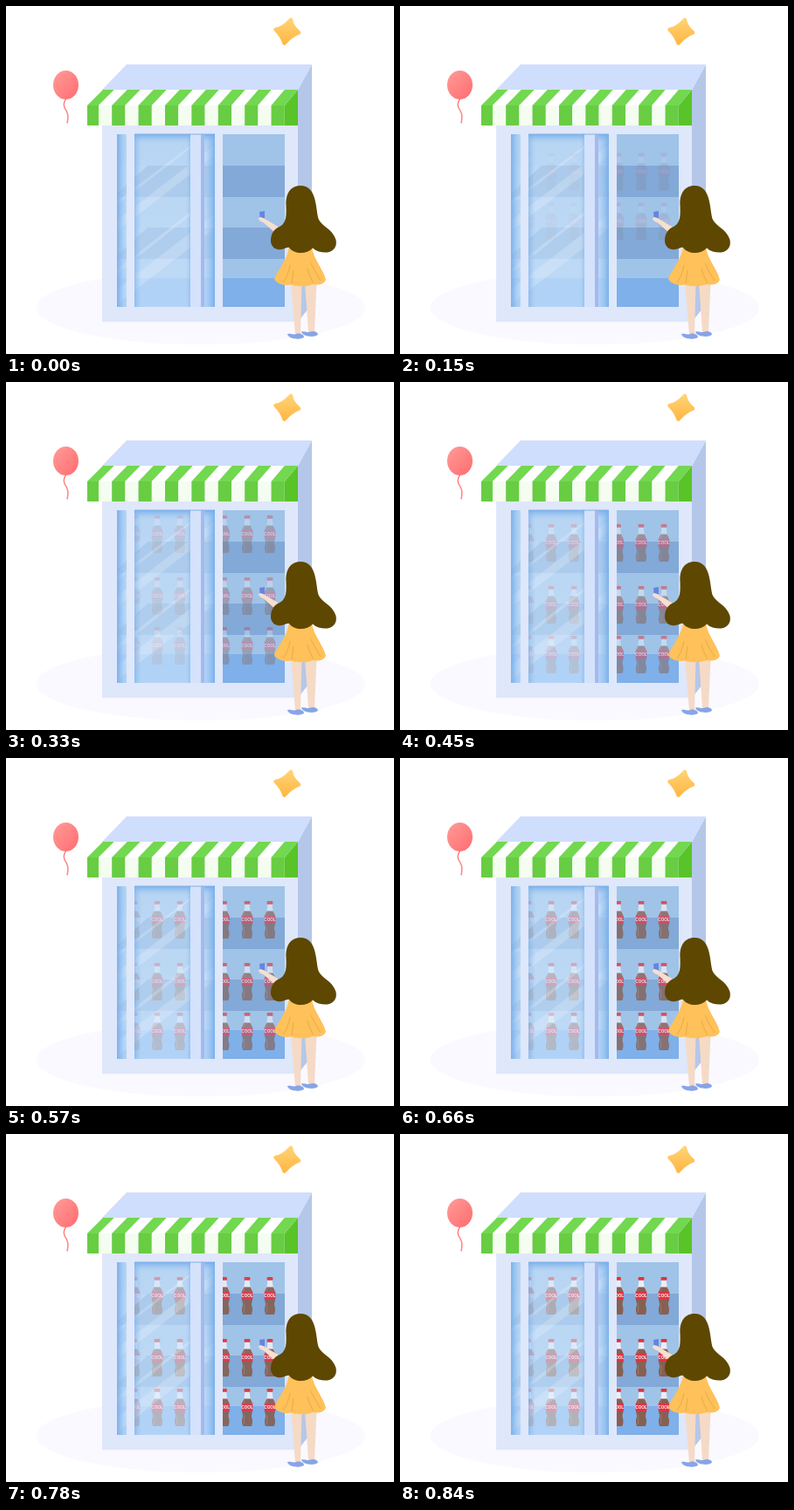
An HTML page for the animation above (1.04 s loop, 444x399 px).

```html
<!DOCTYPE html>
<html lang="en">
<head>
<meta charset="utf-8">
<title>Shop fridge</title>
<style>
  html, body { margin: 0; width: 100%; height: 100%; overflow: hidden; background: #fff; }
  svg { display: block; width: 100vw; height: 100vh; }
  .label { font: 700 4.6px Arial, "Liberation Sans", sans-serif; fill: #fff; text-anchor: middle; }
</style>
</head>
<body>
<svg viewBox="0 0 444 399">
  <defs>
    <linearGradient id="balloon" x1="0" y1="0" x2="1" y2="1">
      <stop offset="0" stop-color="#ff9c98"/><stop offset="1" stop-color="#ff6c70"/>
    </linearGradient>
    <linearGradient id="star" x1="0" y1="0" x2="0" y2="1">
      <stop offset="0" stop-color="#ffd273"/><stop offset="1" stop-color="#ffb846"/>
    </linearGradient>
    <linearGradient id="edgeX">
      <stop offset="0" stop-color="#6fa9e8" stop-opacity=".85"/><stop offset="1" stop-color="#8fbef0" stop-opacity="0"/>
    </linearGradient>
    <linearGradient id="edgeXr" x1="1" x2="0">
      <stop offset="0" stop-color="#6fa9e8" stop-opacity=".85"/><stop offset="1" stop-color="#8fbef0" stop-opacity="0"/>
    </linearGradient>
    <linearGradient id="edgeY" x1="0" y1="0" x2="0" y2="1">
      <stop offset="0" stop-color="#6fa9e8" stop-opacity=".8"/><stop offset="1" stop-color="#8fbef0" stop-opacity="0"/>
    </linearGradient>
    <linearGradient id="glass" x1="0" y1="0" x2="0" y2="1">
      <stop offset="0" stop-color="#cbe4fc" stop-opacity=".55"/><stop offset="1" stop-color="#d3eaff" stop-opacity=".6"/>
    </linearGradient>
    <clipPath id="inside">
      <path d="M147 147H211V345H147ZM248 147H319V345H248Z"/>
    </clipPath>
    <clipPath id="panes">
      <path d="M127 147H138V345H127ZM147 147H211V345H147ZM227 147H239V345H227Z"/>
    </clipPath>
    <g id="bottle">
      <path d="M-2.7 3.5H2.7L3.2 9C3.6 12 6 14 6 18H-6C-6 14 -3.6 12 -3.2 9Z" fill="#e9eef8"/>
      <path d="M-3.7 11.5H3.7C4.6 13.5 6 15 6 18V25C6 28 4.9 29 5 31.5C5.2 34 6.2 35 6 38C5.8 40 5.4 42 4.8 43H-4.8C-5.4 42 -5.8 40 -6 38C-6.2 35 -5.2 34 -5 31.5C-4.9 29 -6 28 -6 25V18C-6 15 -4.6 13.5 -3.7 11.5Z" fill="#866052"/>
      <path d="M-3 13L-4.2 18M-3.4 29.5V41" stroke="#9a7668" stroke-width="1" fill="none"/>
      <rect x="-3.4" width="6.8" height="3.8" rx="1" fill="#e23434"/>
      <rect x="-6.3" y="16.5" width="12.6" height="9.5" rx=".8" fill="#df3444"/>
      <text class="label" y="23">COOL</text>
    </g>
  </defs>

  <ellipse cx="223" cy="346" rx="188" ry="42" fill="#f9f9ff"/>

  <!-- balloon and star -->
  <path d="M69 106C64 113 67 117 69.500 121C72 126 71 130 70 134.500" fill="none" stroke="#ff8382" stroke-width="1.500"/>
  <ellipse cx="68.500" cy="90.500" rx="14.500" ry="16.500" fill="url(#balloon)"/>
  <path d="M326 16Q326.500 23 335 30.500Q327 33.500 318.500 42.500Q316 34.500 308.500 27Q316.500 26 326 16Z" fill="url(#star)" stroke="url(#star)" stroke-width="4.500" stroke-linejoin="round"/>

  <!-- kiosk -->
  <path d="M334 96L350 67V342L334 362Z" fill="#b5c7e9"/>
  <path d="M110 96L138 67H350L334 96Z" fill="#cfdefd"/>
  <path d="M110 96H334V362H110Z" fill="#dfe7fa"/>
  <g id="awning"></g>

  <!-- fridge interior -->
  <g id="shelves"></g>
  <g clip-path="url(#inside)"><g id="stock" opacity="0"></g></g>

  <!-- sliding door -->
  <g clip-path="url(#panes)">
    <path d="M127 147H239V345H127Z" fill="url(#glass)"/>
    <path d="M127 183H162L127 215ZM127 254H162L127 286Z" fill="#c4e0fa" opacity=".65"/>
    <g fill="#fff" opacity=".2">
      <path d="M127 246L239 159V171L127 258Z"/>
      <path d="M127 224L211 160V163L127 228Z"/>
      <path d="M127 325L239 238V255L127 342Z"/>
      <path d="M127 302L211 236V240L127 307Z"/>
    </g>
    <path d="M127 147H138V345H127Z" fill="url(#edgeX)"/>
    <path d="M147 147H155V345H147Z" fill="url(#edgeX)" opacity=".65"/>
    <path d="M206 147H211V345H206Z" fill="url(#edgeXr)" opacity=".45"/>
    <path d="M227 147H239V345H227Z" fill="url(#edgeXr)"/>
    <path d="M147 147H239V157H147Z" fill="url(#edgeY)"/>
  </g>
  <path d="M138 147H147V345H138ZM239 147H248V345H239Z" fill="#dfe7fa"/>
  <path d="M211 147H223V345H211Z" fill="#d5e2fb"/>
  <path d="M223 147H227V345H223Z" fill="#a5b9ee"/>
  <path d="M147 147H239" stroke="#7fb1e9" stroke-width="1"/>

  <!-- shopper -->
  <path d="M290 236L296 235V243.500L290.500 243Z" fill="#6685e0"/>
  <path d="M289 243.500C290 241.500 293 242 296 244L313 254L309 261L295 248.500C292 247 289 246 289 243.500Z" fill="#f6dfcf"/>
  <path d="M326 316H338.500L337 377H331ZM342 316H355.500L353 374H346Z" fill="#f5dac6"/>
  <path d="M322 376C325 375 328 377.500 332 376C336 374.500 341 377 341 379.500C339 383 323 382.500 322 376ZM338 373.500C341 372.500 344 375 348 373.500C352 372 357 374 357 376.500C355 380.500 339 379.500 338 373.500Z" fill="#86a4e8"/>
  <path d="M324 276H350C352 291 363 301 366 314C364 319 357 320.500 351 319C344 322 333 322 326 319.500C319 321 310 319 307 313C311 302 322 291 324 276Z" fill="#ffc15a"/>
  <path d="M325 297C323 306 321 312 317 317M329 303L327 318M345 301C347 309 350 314 352 318M349 295C353 304 357 310 360 315" fill="none" stroke="#e9ab45" stroke-width="1"/>
  <path d="M337 206C325 206 320 216 320.500 228C321 240 321 248 314 252.500C305 256 303 263 303 270C304 277 309 280 315 279C319 278.500 322 276 324 277C330 285 344 285 351 277.500C356 282 362 283 368 282.500C376 281 379 275 377.500 268C374 256 362 253 358 245C354 235 357 206 337 206Z" fill="#5e4700"/>
</svg>

<script>
  const el = id => document.getElementById(id);

  // Awning: slanted top and upright valance share the same stripe edges
  const edges = [93, ...Array.from({ length: 15 }, (_, i) => 106 + 15.2 * i)];
  const topX = x => 111 + (x - 93) * 223 / 226;
  const stripes = edges.slice(1).map((b, i) => {
    const a = edges[i], green = i % 2 === 0;
    return `<path d="M${topX(a)} 96H${topX(b)}L${b} 114H${a}Z" fill="${green ? '#72d84f' : '#fff'}"/>` +
           `<path d="M${a} 114H${b}V137H${a}Z" fill="${green ? '#68cd42' : '#f4fdf0'}"/>`;
  });
  el('awning').innerHTML = stripes.join('') + '<path d="M319 114L334 96V137H319Z" fill="#58c428"/>';

  const bands = [[147, '#a0c3e8'], [183, '#82a9d7'], [219, '#a0c3e8'],
                 [254, '#82a9d7'], [290, '#a0c3e8'], [312, '#7fb0ea'], [345]];
  el('shelves').innerHTML = bands.slice(0, -1).map(([y, fill], i) =>
    `<rect x="127" y="${y}" width="192" height="${bands[i + 1][0] - y}" fill="${fill}"/>`).join('');

  const stock = el('stock');
  stock.innerHTML = [164, 235, 292].map(y => [147, 173, 199, 249.5, 276, 302].map(x =>
    `<use href="#bottle" x="${x}" y="${y}"/>`).join('')).join('');

  // Bottles drop in with a cubic ease-out while fading in, at 30 ms per step
  const LOOP = 1040, STEP = 30, START = 60, FADE = 780, DROP = 490, HEIGHT = 122;
  const clamp = v => Math.min(1, Math.max(0, v));
  const origin = performance.now();

  function draw(now) {
    const t = Math.floor(Math.max(0, now - origin) % LOOP / STEP) * STEP - START;
    const left = 1 - clamp(t / DROP);
    stock.setAttribute('opacity', clamp(t / FADE));
    stock.setAttribute('transform', `translate(0 ${-HEIGHT * left ** 3})`);
    requestAnimationFrame(draw);
  }
  draw(origin);
</script>
</body>
</html>
```
